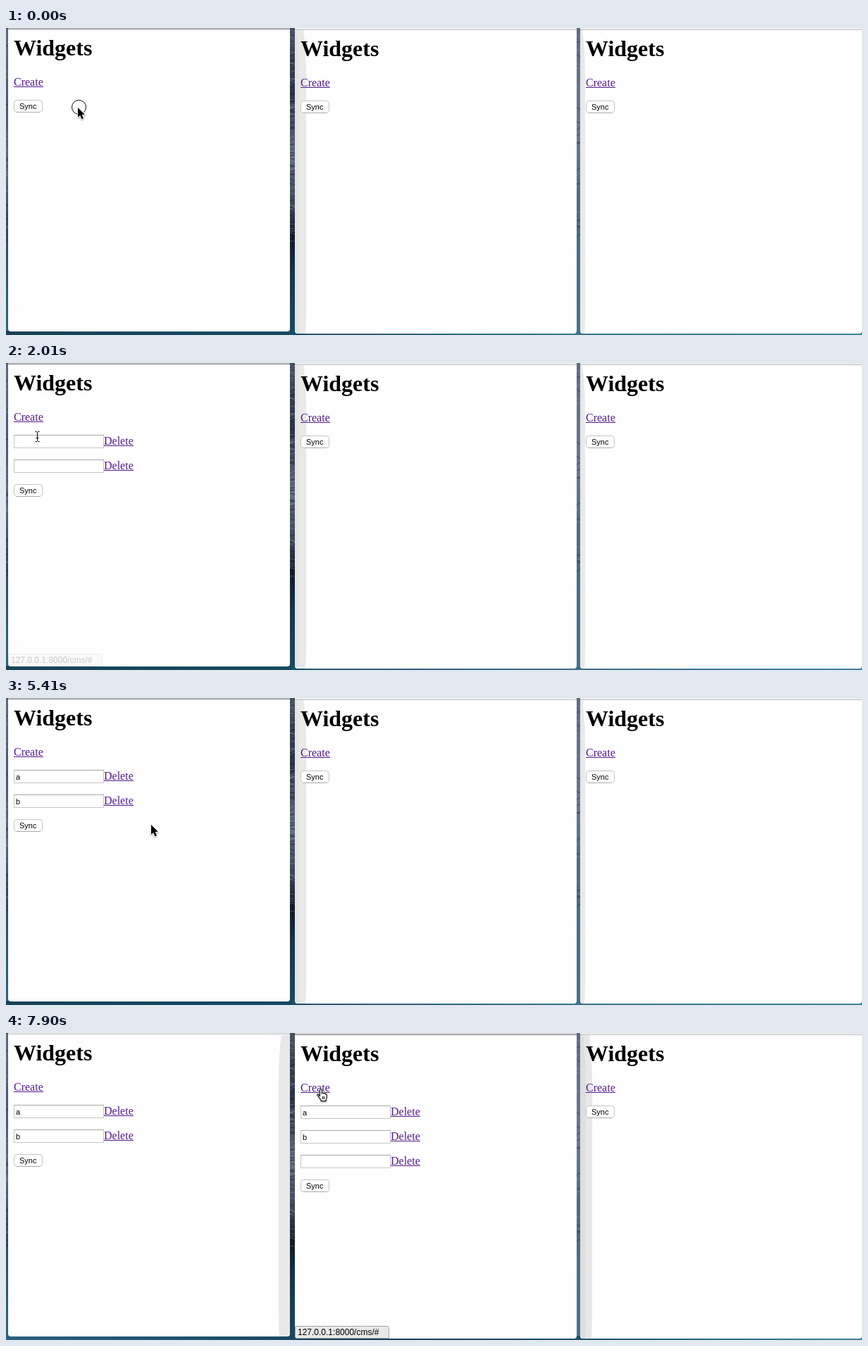
An HTML page with a canvas that plays this animation: 1215x436 px, repeating every 8 s.

```html
<!DOCTYPE html>
<html lang="en">
<head>
<meta charset="utf-8">
<title>Widgets</title>
<style>
html, body { margin: 0; width: 100%; height: 100%; overflow: hidden; }
canvas { display: block; }
</style>
</head>
<body>
<canvas id="stage" width="1215" height="436"></canvas>
<script>
const ctx = document.getElementById('stage').getContext('2d');
const W = 1215, H = 436, LOOP = 8000;
const SERIF = '"Liberation Serif", Times, serif';
const SANS = '"Liberation Sans", Arial, sans-serif';

const WINDOWS = [
  { x: 3, top: 2, bottom: 431 },
  { x: 410, top: 3, bottom: 434 },
  { x: 815, top: 3, bottom: 434 }
];

// Pointer moves: start and end time, number of steps, waypoints [progress, x, y].
const MOVES = [
  { from: 60, to: 520, steps: 9, ease: true, path: [[0, 101.5, 112.5], [1, 48, 89]] },
  { from: 700, to: 960, steps: 6, path: [[0, 48, 89], [1, 40, 77.5]] },
  { from: 1575, to: 2100, steps: 10, ease: true, path: [[0, 40, 77.5], [1, 44, 106.5]] },
  { from: 2410, to: 2850, steps: 8, ease: true, path: [[0, 44, 106.5], [1, 38.5, 141.5]] },
  { from: 4260, to: 4760, steps: 10,
    path: [[0, 38.5, 141.5], [0.25, 22, 160], [0.5, 6.5, 181.5], [1, 26.5, 186.5]] },
  { from: 5290, to: 5650, steps: 7, ease: true,
    path: [[0, 26.5, 186.5], [0.5, 255, 178], [1, 512.5, 199.5]] },
  { from: 5980, to: 6510, steps: 10, ease: true, path: [[0, 512.5, 199.5], [1, 447, 114]] },
  { from: 7190, to: 7570, steps: 8, path: [[0, 447, 114], [1, 445.5, 77.5]] }
];

const CLICKS = [[0, 60], [1170, 1230], [1460, 1520], [2170, 2230], [3030, 3090],
  [3330, 3390], [5000, 5050], [5860, 5920], [6840, 6900], [7840, 7900]];

const HAND = new Path2D('M4.5 10.5V2q0-1.5 1.4-1.5T7.3 2V7q.2-1 1.4-1t1.3 1.2q.3-.8 1.4-.6' +
  't1.2 1.3q1.5-.4 1.6 1.2v3q0 2-1 3.5v2h-7v-1.5q-2-2-3.3-4.5q-1.2-2-2-2.6q0-1.6 1.6-1z');
const ARROW = new Path2D('M0 0V14L3.2 11L5.5 16.4L8 15.3L5.8 10H10Z');

const within = (t, a, b) => t >= a && t < b;
const ramp = (t, a, b) => Math.min(1, Math.max(0, (t - a) / (b - a)));
const smooth = p => p * p * (3 - 2 * p);

function rect(color, x, y, w, h) {
  ctx.fillStyle = color;
  ctx.fillRect(x, y, w, h);
}

function text(str, x, y, font, color = '#000') {
  ctx.font = font;
  ctx.fillStyle = color;
  ctx.fillText(str, x, y);
}

function vertical(stops) {
  const g = ctx.createLinearGradient(0, 0, 0, H);
  stops.forEach(([p, c]) => g.addColorStop(p, c));
  return g;
}

function randomizer(seed) {
  return () => (seed = (seed * 16807) % 2147483647) / 2147483647;
}

function drawDesktop(active) {
  rect(vertical([[0, '#5d6b80'], [0.25, '#4b5a70'], [0.45, '#5b6b80'],
    [0.65, '#2d4a62'], [1, '#2f6684']]), 0, 0, 405, H);
  rect(vertical([[0, '#454f5e'], [0.2, '#2d3646'], [0.42, '#5e6979'],
    [0.58, '#3a4556'], [0.68, '#121a28'], [0.8, '#173549'], [1, '#1a4961']]), 403, 0, 7, H);
  rect(vertical([[0, '#5d6d84'], [0.35, '#687c94'], [0.55, '#4b6c87'],
    [1, '#407590']]), 810, 0, 5, H);

  const rnd = randomizer(71);
  for (let i = 0; i < 150; i++) {
    const y = rnd() * 310, dark = rnd() < 0.55;
    ctx.strokeStyle = dark ? 'rgba(12,18,32,.45)' : 'rgba(165,178,196,.35)';
    ctx.lineWidth = 1;
    const x = i % 3 ? 403 : i % 2 ? 810 : 0;
    const width = x === 403 ? 7 : x ? 5 : 3;
    ctx.beginPath();
    ctx.moveTo(x, y);
    ctx.lineTo(x + width, y + rnd() * 8 - 4);
    ctx.stroke();
  }

  const floor = ctx.createLinearGradient(0, 0, W, 0);
  floor.addColorStop(0, active ? '#2b5f7e' : '#174258');
  floor.addColorStop(0.33, active ? '#1a4860' : '#174a62');
  floor.addColorStop(0.36, active ? '#153e53' : '#2b5a75');
  floor.addColorStop(0.66, active ? '#1d5068' : '#3d708c');
  floor.addColorStop(1, '#4381a0');
  rect(floor, 0, 430, W, 6);
}

function drawFrame({ x, top, bottom }, focused) {
  rect(focused ? '#d2d2d2' : '#ececec', x, 0, 400, top);
  rect(focused ? '#767a80' : '#c2c2c2', x, top - 1, 400, 1);
  ctx.fillStyle = '#fefefe';
  ctx.beginPath();
  ctx.roundRect(x, top, 400, bottom - top, [0, 0, 4, 4]);
  ctx.fill();
}

// Soft shadow a neighbouring window casts on a page edge.
function drawShade(x, edge, bottom, color) {
  const lean = Math.sign(edge - x) * 4;
  ctx.fillStyle = color;
  ctx.beginPath();
  ctx.moveTo(x, 3);
  ctx.lineTo(edge - lean, 3);
  ctx.quadraticCurveTo(edge, 30, edge, 70);
  ctx.lineTo(edge, bottom - 35);
  ctx.quadraticCurveTo(edge, bottom - 8, edge - lean / 3, bottom);
  ctx.lineTo(x + lean, bottom);
  ctx.lineTo(x, bottom - 4);
  ctx.fill();
}

function link(label, x, y) {
  text(label, x, y, '16px ' + SERIF, '#551a8b');
  rect('#551a8b', x, y + 1, 42, 1);
}

function drawInput(x, y, value, focused, caret) {
  if (focused) {
    [['#c3def8', 2.5, 3], ['#8bc0f3', 1.5, 2], ['#5ca5ee', 0.5, 1]].forEach(([color, grow, r]) => {
      ctx.fillStyle = color;
      ctx.beginPath();
      ctx.roundRect(x - grow, y - grow, 128 + 2 * grow, 19 + 2 * grow, r);
      ctx.fill();
    });
  } else {
    rect('#c6c6c6', x, y, 128, 19);
    rect('#a9a9a9', x, y, 128, 1);
  }
  rect('#fff', x + 1, y + 1, 126, 17);
  text(value, x + 3, y + 14, '11px ' + SANS);
  if (caret) rect('#000', x + 3 + (value ? 7 : 0), y + 3, 1, 13);
}

function drawButton(x, y) {
  ctx.fillStyle = '#fff';
  ctx.strokeStyle = '#c3c3c3';
  ctx.lineWidth = 1;
  ctx.beginPath();
  ctx.roundRect(x + 0.5, y + 0.5, 40, 17, 4);
  ctx.fill();
  ctx.stroke();
  rect('#a9a9a9', x + 4, y + 17, 33, 1);
  text('Sync', x + 8, y + 13, '11px ' + SANS);
}

function drawPage(win, rows) {
  const x = win.x + 8, y = win.top;
  text('Widgets', x, y + 37, 'bold 32px ' + SERIF);
  link('Create', x, y + 80);
  rows.forEach((row, i) => {
    const top = y + 100 + 35 * i;
    drawInput(x, top, row.value, row.focused, row.caret);
    link('Delete', x + 128, top + 14);
  });
  drawButton(x, y + 100 + 35 * rows.length);
}

function drawStatus({ x, bottom }, alpha) {
  if (alpha <= 0) return;
  ctx.globalAlpha = alpha;
  ctx.fillStyle = '#e8e8e8';
  ctx.strokeStyle = '#a6a6a6';
  ctx.lineWidth = 1;
  ctx.beginPath();
  ctx.roundRect(x + 0.5, bottom - 17.5, 133, 17, [0, 3, 0, 3]);
  ctx.fill();
  ctx.stroke();
  text('127.0.0.1:8000/cms/#', x + 4, bottom - 5, '12px ' + SANS);
  ctx.globalAlpha = 1;
}

function leftRows(t) {
  const rows = [];
  if (t >= 1230) rows.push({
    value: t >= 2350 ? 'a' : '',
    focused: within(t, 2170, 3030),
    caret: within(t, 2170, 2790)
  });
  if (t >= 1520) rows.push({
    value: t >= 4080 ? 'b' : '',
    focused: within(t, 3030, 5000),
    caret: within(t, 3030, 3570) || within(t, 4020, 4610)
  });
  return rows;
}

function middleRows(t) {
  const values = t >= 7900 ? ['a', 'b', ''] : t >= 6900 ? ['a', 'b'] : [];
  return values.map(value => ({ value }));
}

function pointerAt(t) {
  let move = MOVES[0], p = 0;
  for (const m of MOVES) {
    if (t < m.from) break;
    move = m;
    p = Math.min(1, Math.floor((t - m.from) / (m.to - m.from) * (m.steps - 1) + 1) / m.steps);
  }
  if (move.ease) p = smooth(p);
  const i = Math.max(1, move.path.findIndex(point => point[0] >= p));
  const [p0, x0, y0] = move.path[i - 1], [p1, x1, y1] = move.path[i];
  const k = (p - p0) / (p1 - p0);
  return { x: x0 + (x1 - x0) * k, y: y0 + (y1 - y0) * k };
}

function pointerKind({ x, y }, t, left, middle) {
  const first = x < 405;
  const win = WINDOWS[first ? 0 : 1];
  const u = x - win.x - 8, v = y - win.top;
  if (u >= 0 && u < 42 && v > 66 && v < 85) return 'hand';
  const count = (first ? left : middle).length;
  const row = Math.floor((v - 99) / 35);
  const onInput = u > 0 && u < 128 && row >= 0 && row < count && v - 99 - row * 35 < 21;
  return onInput ? 'beam' : 'arrow';
}

function drawPointer({ x, y }, kind) {
  ctx.save();
  ctx.lineJoin = 'round';
  if (kind === 'beam') {
    ctx.translate(Math.round(x + 0.5), Math.round(y - 6));
    ctx.strokeStyle = '#000';
    ctx.lineWidth = 1;
    ctx.beginPath();
    ctx.moveTo(-2.5, 0.5);
    ctx.lineTo(-0.5, 0.5);
    ctx.lineTo(0.5, 1.5);
    ctx.lineTo(0.5, 13.5);
    ctx.lineTo(-0.5, 14.5);
    ctx.lineTo(-2.5, 14.5);
    ctx.moveTo(3.5, 0.5);
    ctx.lineTo(1.5, 0.5);
    ctx.lineTo(0.5, 1.5);
    ctx.moveTo(0.5, 13.5);
    ctx.lineTo(1.5, 14.5);
    ctx.lineTo(3.5, 14.5);
    ctx.moveTo(-1.5, 9.5);
    ctx.lineTo(2.5, 9.5);
    ctx.stroke();
  } else {
    const hand = kind === 'hand', shape = hand ? HAND : ARROW;
    ctx.translate(Math.round(hand ? x - 5 : x) , Math.round(hand ? y + 1 : y));
    ctx.shadowColor = 'rgba(0,0,0,.35)';
    ctx.shadowBlur = 2;
    ctx.shadowOffsetY = 1;
    ctx.strokeStyle = '#fff';
    ctx.lineWidth = 2;
    ctx.stroke(shape);
    ctx.shadowColor = 'transparent';
    ctx.fillStyle = hand ? '#fff' : '#000';
    ctx.fill(shape);
    if (hand) {
      ctx.strokeStyle = '#000';
      ctx.lineWidth = 1.1;
      ctx.stroke(shape);
      rect('#000', 8, 11, 1, 4);
      rect('#000', 10, 11, 1, 4);
    }
  }
  ctx.restore();
}

function drawRing({ x, y }) {
  ctx.strokeStyle = '#000';
  ctx.lineWidth = 1;
  ctx.beginPath();
  ctx.arc(x + 2, y, 10, 0, Math.PI * 2);
  ctx.stroke();
}

function draw(t) {
  const active = t < 5860 ? 0 : 1;
  const [first, second, third] = WINDOWS;
  const left = leftRows(t), middle = middleRows(t);

  drawDesktop(active);
  WINDOWS.forEach((win, i) => drawFrame(win, i === active));
  if (active) {
    drawShade(403, 387, first.bottom, '#e8e8e8');
    drawShade(815, 832, third.bottom, '#e8e8e8');
    drawShade(815, 823, third.bottom, '#dedede');
  } else {
    drawShade(410, 426, second.bottom, '#e9e9e9');
    drawShade(410, 416, second.bottom, '#e4e4e4');
    drawShade(815, 822, third.bottom, '#e9e9e9');
  }
  drawPage(first, left);
  drawPage(second, middle);
  drawPage(third, []);
  drawStatus(first, ramp(t, 780, 940) - ramp(t, 1850, 2050));
  drawStatus(second, ramp(t, 7400, 7560));

  const pointer = pointerAt(t);
  if (CLICKS.some(([a, b]) => within(t, a, b))) drawRing(pointer);
  drawPointer(pointer, pointerKind(pointer, t, left, middle));
}

const start = performance.now();
function tick() {
  draw((performance.now() - start) % LOOP);
  requestAnimationFrame(tick);
}
tick();
</script>
</body>
</html>
```
